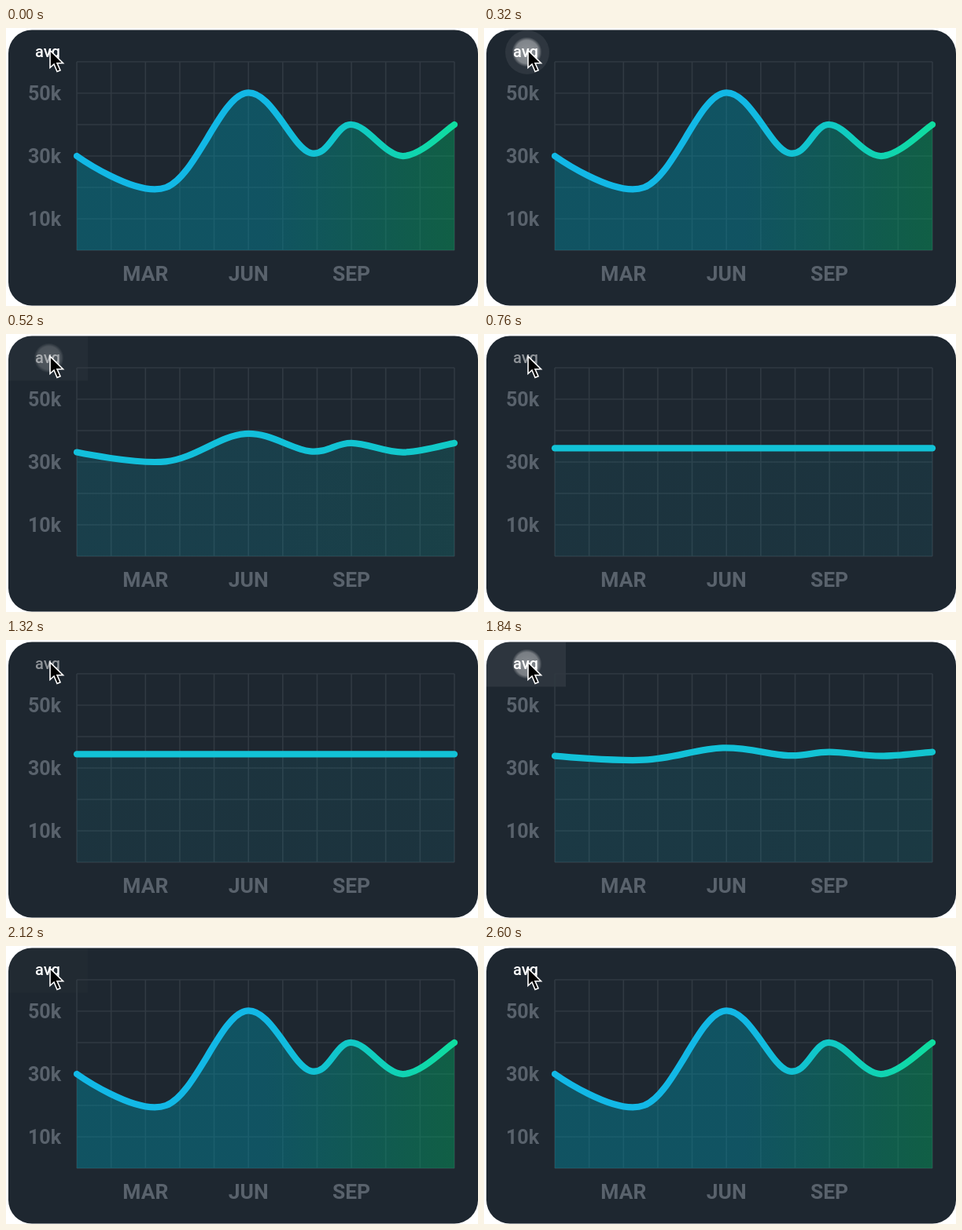
An HTML page that plays this animation: 600x354 px, repeating every 2.68 s.

```html
<!DOCTYPE html>
<html lang="en">
<head>
<meta charset="utf-8">
<title>Line chart with average toggle</title>
<style>
  html, body { margin: 0; width: 100%; height: 100%; overflow: hidden; background: #fff; }
  svg { display: block; width: 600px; height: 354px; font-family: Roboto, sans-serif; }
  .axis { fill: #59626c; font-weight: 700; }
  .left { font-size: 25px; text-anchor: end; }
  .bottom { font-size: 26.4px; text-anchor: middle; }
  #label { font-size: 20px; font-weight: 500; fill: #fff; }
  #grid { fill: none; stroke: #303942; stroke-width: 1.65; }
  #line { fill: none; stroke: url(#lineFill); stroke-width: 8.25; stroke-linecap: round; stroke-linejoin: round; }
</style>
</head>
<body>
<svg viewBox="0 0 600 354">
  <defs>
    <linearGradient id="lineFill" gradientUnits="userSpaceOnUse" x1="90" x2="570" y1="0" y2="0">
      <stop offset=".5"/><stop offset="1"/>
    </linearGradient>
    <linearGradient id="areaFill" gradientUnits="userSpaceOnUse" x1="90" x2="570" y1="0" y2="0">
      <stop offset=".5"/><stop offset="1"/>
    </linearGradient>
    <radialGradient id="glow">
      <stop offset="0" stop-color="#fff"/>
      <stop offset=".78" stop-color="#fff" stop-opacity=".85"/>
      <stop offset="1" stop-color="#fff" stop-opacity="0"/>
    </radialGradient>
    <clipPath id="cardClip"><rect x="3" y="2.5" width="597" height="351" rx="30"/></clipPath>
    <clipPath id="buttonClip"><rect x="3" y="2.5" width="101" height="57"/></clipPath>
  </defs>
  <g clip-path="url(#cardClip)">
    <rect width="600" height="354" fill="#1e2730"/>
    <g clip-path="url(#buttonClip)"><circle id="splash" cx="55" cy="31" fill="#fff"/></g>
  </g>
  <path id="grid"/>
  <path id="area" fill="url(#areaFill)"/>
  <path id="line"/>
  <g class="axis left">
    <text x="70" y="91.8">50k</text>
    <text x="70" y="171.8">30k</text>
    <text x="70" y="251.8">10k</text>
  </g>
  <g class="axis bottom">
    <text x="177.3" y="321.5">MAR</text>
    <text x="308.2" y="321.5">JUN</text>
    <text x="439.1" y="321.5">SEP</text>
  </g>
  <text id="label" x="37" y="37">avg</text>
  <circle id="press" cx="54.5" cy="30.5" r="19" fill="url(#glow)"/>
  <path d="M56 28.5V50.5L61 46L65 55.5L69 53.8L65 44.8H72.5Z" fill="#000" stroke="#fff" stroke-width="1.6"/>
</svg>
<script>
  const LOOP = 2680, TICK = 40;
  const LEFT = 90, BASE = 283, UNIT_X = 480 / 11, UNIT_Y = 40, AVERAGE = 3.44;
  const spots = [[0, 3], [2.6, 2], [4.9, 5], [6.8, 3.1], [8, 4], [9.5, 3], [11, 4]];

  // Colours are [r, g, b, a]: first and last gradient stop.
  const dataLook = {
    line: [[18, 184, 230, 1], [15, 221, 159, 1]],
    area: [[0, 137, 159, .45], [0, 163, 95, .45]]
  };
  const avgLook = {
    line: [[18, 194, 214, 1], [18, 194, 214, 1]],
    area: [[10, 165, 190, .1], [10, 165, 190, .1]]
  };
  const taps = [
    { down: 160, up: 402, morph: 167, end: 600 },
    { down: 1680, up: 1823, morph: 134, end: 2180 }
  ];

  const $ = id => document.getElementById(id);
  const clamp = v => Math.min(1, Math.max(0, v));
  const mix = (a, b, k) => a + (b - a) * k;

  function drawGrid() {
    let d = '';
    for (let i = 0; i <= 11; i++) d += `M${LEFT + i * UNIT_X} 43V${BASE}`;
    for (let i = 0; i <= 6; i++) d += `M${LEFT} ${BASE - i * UNIT_Y}H570`;
    $('grid').setAttribute('d', d);
  }

  // Smooth curve whose handles follow the neighbours of each spot.
  function curve(flat) {
    const pts = spots.map(([x, y]) => [LEFT + x * UNIT_X, BASE - mix(y, AVERAGE, flat) * UNIT_Y]);
    let d = `M${pts[0]}`, handle = [0, 0];
    for (let i = 1; i < pts.length; i++) {
      const prev = pts[i - 1], cur = pts[i], next = pts[i + 1] || cur;
      const c1 = prev.map((v, j) => v + handle[j]);
      handle = prev.map((v, j) => (next[j] - v) / 2 * .35);
      const c2 = cur.map((v, j) => v - handle[j]);
      d += `C${c1} ${c2} ${cur}`;
    }
    return d;
  }

  function paint(part, flat) {
    $(part + 'Fill').querySelectorAll('stop').forEach((stop, i) => {
      const c = dataLook[part][i].map((v, j) => mix(v, avgLook[part][i][j], flat));
      stop.setAttribute('stop-color', `rgb(${c.slice(0, 3).map(Math.round)})`);
      stop.setAttribute('stop-opacity', c[3]);
    });
  }

  function drawTap(t) {
    const tap = taps.find(p => t >= p.down && t < p.end);
    let radius = 0, splash = 0, press = 0;
    if (tap) {
      const held = t - tap.down, after = Math.max(0, t - tap.up);
      radius = 12 + 20 * clamp(held / 200) + 85 * clamp(after / 40);
      splash = .07 * (1 - after / (tap.end - tap.up));
      press = .46 * clamp((held + 40) / 160) * (1 - clamp(after / 220));
    }
    $('splash').setAttribute('r', radius);
    $('splash').setAttribute('opacity', splash);
    $('press').setAttribute('opacity', press);
  }

  function render(time) {
    const t = Math.floor(time % LOOP / TICK) * TICK;
    const [on, off] = taps.map(p => clamp((t - p.up) / p.morph));
    const flat = on - off;
    const d = curve(flat);
    $('line').setAttribute('d', d);
    $('area').setAttribute('d', `${d}V${BASE}H${LEFT}Z`);
    paint('line', flat);
    paint('area', flat);
    $('label').setAttribute('fill-opacity', t >= taps[0].up && t < taps[1].up ? .5 : 1);
    drawTap(t);
  }

  function loop() {
    render(performance.now());
    requestAnimationFrame(loop);
  }

  drawGrid();
  loop();
</script>
</body>
</html>
```
